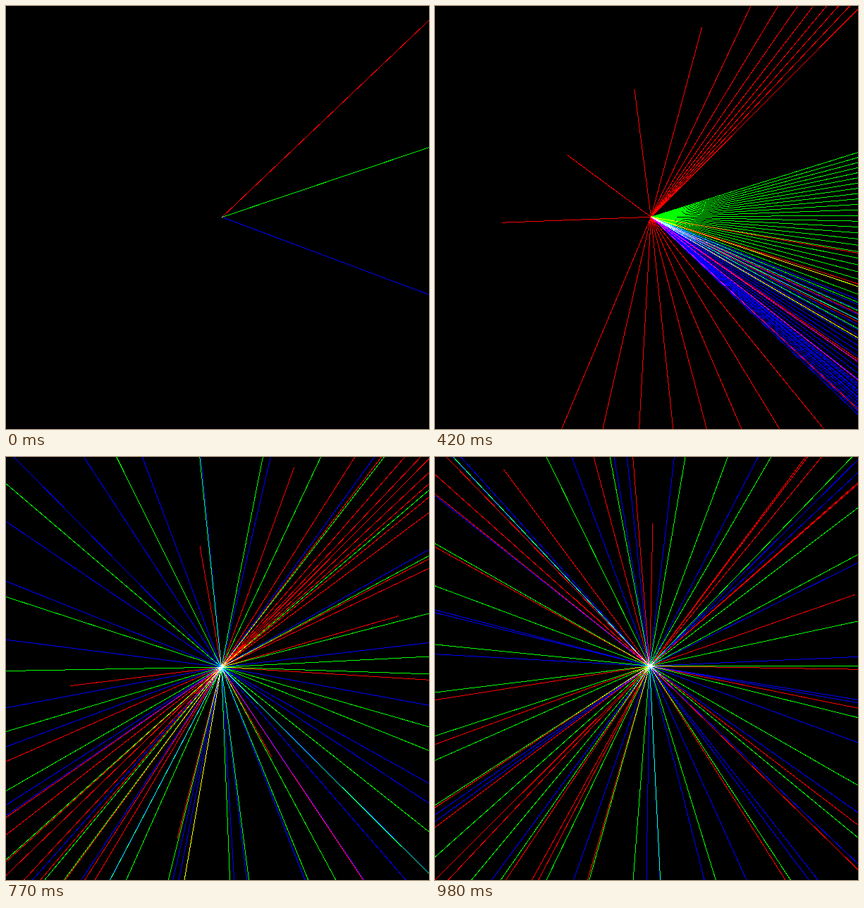
Animation, 600 px wide and 600 px high, one loop 1050 ms. Source, as an HTML page with a canvas:

```html
<!DOCTYPE html>
<html>
<head>
<meta charset="utf-8">
<style>
html, body { margin: 0; height: 100%; overflow: hidden; background: #000; }
canvas { display: block; }
</style>
</head>
<body>
<canvas id="stage" width="600" height="600"></canvas>
<script>
const ctx = document.getElementById('stage').getContext('2d');
const SIZE = 600, MID = 300, RADIUS = 600, COUNT = 30, STEPS = 15, STEP_MS = 70;

// Each ray i turns at i * t^power; its x phase wraps every `wrap` rays
const fans = [
  { color: '#f00', power: 2, wrap: 12.9, shift: -0.338 },
  { color: '#0f0', power: 4, wrap: Infinity, shift: 1.229 },
  { color: '#00f', power: 4, wrap: 19.8, shift: 1.949 }
];

// Hard-edged line, one pixel wide across its direction
function drawLine(x0, y0, x1, y1) {
  const dx = x1 - x0, dy = y1 - y0;
  const steps = Math.max(Math.abs(dx), Math.abs(dy));
  const half = Math.hypot(dx, dy) / steps / 2;
  const flat = Math.abs(dx) > Math.abs(dy);
  for (let n = 0; n <= steps; n++) {
    const x = x0 + dx * n / steps, y = y0 + dy * n / steps;
    if (x < -1 || y < -1 || x > SIZE || y > SIZE) return;
    const across = flat ? y : x;
    const from = Math.ceil(across - half), width = Math.ceil(across + half) - from;
    if (flat) ctx.fillRect(Math.round(x), from, 1, width);
    else ctx.fillRect(from, Math.round(y), width, 1);
  }
}

function draw(step) {
  const t = step / STEPS, drift = (step / (STEPS - 1)) ** 3;
  const x0 = 306 - 2 * drift, y0 = 299 - 3 * drift;
  ctx.globalCompositeOperation = 'source-over';
  ctx.fillStyle = '#000';
  ctx.fillRect(0, 0, SIZE, SIZE);
  ctx.globalCompositeOperation = 'lighter';
  for (const { color, power, wrap, shift } of fans) {
    const turn = t ** power;
    ctx.fillStyle = color;
    for (let i = 1; i <= COUNT; i++) {
      drawLine(x0, y0,
        MID + RADIUS * Math.cos(i % wrap * turn),
        MID - RADIUS * Math.cos(i * turn + shift));
    }
  }
}

let shown = -1;
function tick() {
  const step = Math.floor(performance.now() / STEP_MS) % STEPS;
  if (step !== shown) draw(shown = step);
  requestAnimationFrame(tick);
}
tick();
</script>
</body>
</html>
```
